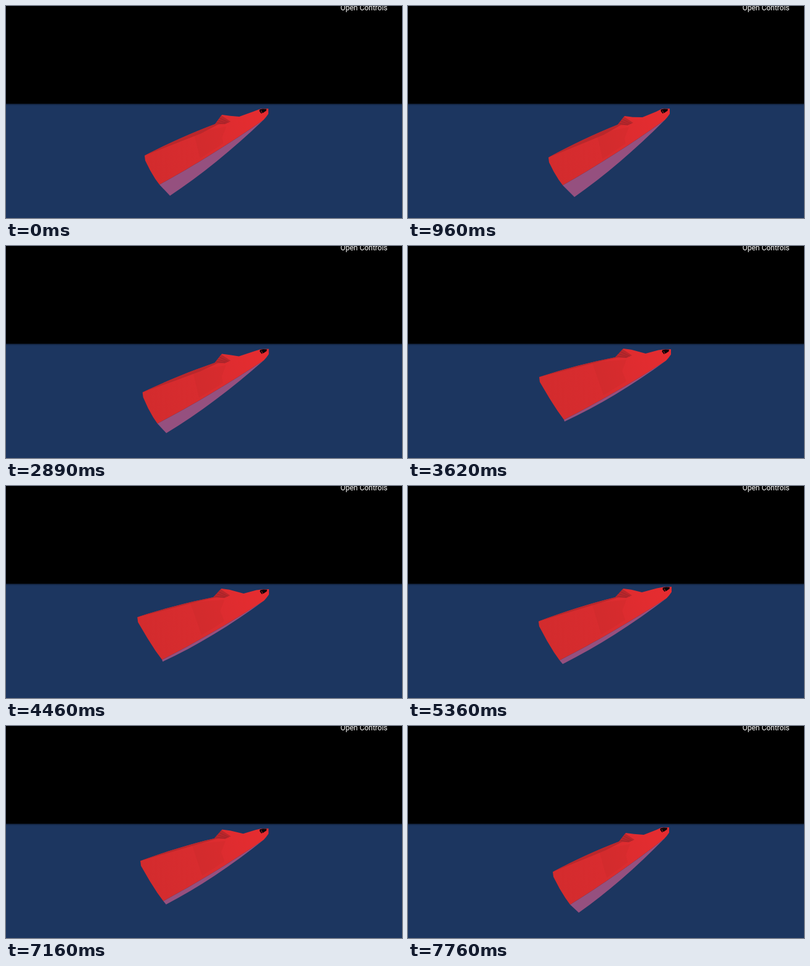
An HTML page that plays this animation: 640 by 343 pixels, repeating every 7840 ms.

```html
<!DOCTYPE html>
<html lang="en">
<head>
<meta charset="utf-8">
<title>Boat on water</title>
<style>
  html, body { margin: 0; width: 100%; height: 100%; overflow: hidden; background: #000; }
  svg { display: block; width: 100%; height: 100%; }
  text { font: 12px Roboto, Arial, sans-serif; fill: #fff; text-anchor: middle; }
</style>
</head>
<body>
<svg viewBox="0 0 640 343">
  <defs>
    <linearGradient id="sea" x1="0" y1="158" x2="0" y2="161" gradientUnits="userSpaceOnUse">
      <stop offset="0" stop-color="#0e1b30"/>
      <stop offset="1" stop-color="#1c3660"/>
    </linearGradient>
    <linearGradient id="paint" x1="220" y1="270" x2="420" y2="175" gradientUnits="userSpaceOnUse">
      <stop offset="0" stop-color="#d22b2d"/>
      <stop offset=".5" stop-color="#d92c2f"/>
      <stop offset="1" stop-color="#e62c30"/>
    </linearGradient>
  </defs>
  <rect width="640" height="343"/>
  <rect y="158" width="640" height="185" fill="url(#sea)"/>
  <text x="578.5" y="7">Open Controls</text>
  <path id="keel" fill="#95507f"/>
  <path id="hull" fill="url(#paint)"/>
  <path id="facet" fill="#b3262a" opacity=".16"/>
  <path id="deck" fill="#ba272b"/>
  <path id="cabin" fill="#b9272b"/>
  <path id="ribs" fill="none" stroke="#99222a" stroke-width=".8"/>
  <path id="bow" fill="#0a0508"/>
  <path id="slit" fill="none" stroke="#d92c2f" stroke-width=".8"/>
</svg>
<script>
const LOOP = 7840;
const LAST = 7760;

// Swell phase in degrees reached at each time in ms.
const swell = [[0, -80], [949, 295], [2190, 765], [3620, 1230], [5360, 1972], [6500, 2365], [7760, 2880]];

// Poses around one swell: phase, then x,y of stern top, chine, keel, shoulder, cabin peak, foredeck, bow.
const poses = [
  [280, 224,242, 248,289, 265,307, 338,191, 349,176, 377,179, 424,166],
  [295, 227,245, 250,290, 269,309, 339,192, 350,178, 379,180, 423,166],
  [360, 234,236, 262,289, 276,302, 341,187, 352,173, 381,176, 422,164],
  [405, 228,234, 257,288, 270,300, 340,186, 352,171, 380,174, 423,162],
  [510, 212,212, 252,281, 253,284, 335,180, 348,166, 384,174, 425,167],
  [532, 211,219, 245,282, 250,288, 335,180, 348,166, 378,172, 426,163],
  [565, 213,224, 238,283, 246,292, 336,184, 349,171, 376,177, 426,167]
];

const part = Object.fromEntries([...document.querySelectorAll('path')].map(p => [p.id, p]));
const draw = (id, d) => part[id].setAttribute('d', d);
const shift = (p, dx, dy) => [p[0] + dx, p[1] + dy];
const mix = (p, q, k) => [p[0] + (q[0] - p[0]) * k, p[1] + (q[1] - p[1]) * k];
const line = (...pts) => 'M' + pts.map(p => p.map(v => v.toFixed(2))).join('L');
const arc = (p, q, sag) => {
  const c = shift(mix(p, q, .5), 0, 2 * sag);
  return Array.from({ length: 9 }, (_, i) => mix(mix(p, c, i / 8), mix(c, q, i / 8), i / 8));
};

function phaseAt(t) {
  let i = 0;
  while (i < swell.length - 2 && t >= swell[i + 1][0]) i++;
  const [t0, a] = swell[i], [t1, b] = swell[i + 1];
  return a + (b - a) * (t - t0) / (t1 - t0);
}

function poseNear(i) {
  const n = poses.length, turn = Math.floor(i / n);
  const [phase, ...xy] = poses[i - turn * n];
  return [phase + 360 * turn, ...xy];
}

// Smooth cyclic curve through the poses.
function poseAt(phase) {
  const angle = 280 + ((phase - 280) % 360 + 360) % 360;
  let i = 0;
  while (poseNear(i + 1)[0] <= angle) i++;
  const [p, q, r, s] = [-1, 0, 1, 2].map(k => poseNear(i + k));
  const span = r[0] - q[0], u = (angle - q[0]) / span;
  const values = q.map((v, j) => {
    const m0 = (r[j] - p[j]) / (r[0] - p[0]) * span;
    const m1 = (s[j] - q[j]) / (s[0] - q[0]) * span;
    const d = r[j] - v;
    return v + u * (m0 + u * (3 * d - 2 * m0 - m1 + u * (m0 + m1 - 2 * d)));
  });
  return Array.from({ length: 7 }, (_, k) => values.slice(1 + 2 * k, 3 + 2 * k));
}

function render(t) {
  const [stern, chine, keel, shoulder, peak, fore, bow] = poseAt(phaseAt(t));
  const foot = shift(bow, -8, 18.5);
  const roll = (keel[0] - chine[0]) / 17;
  const top = arc(stern, shoulder, -2);
  const waterline = arc(chine, foot, 3);

  draw('keel', line(chine, ...arc(keel, foot, 5.5), ...waterline.slice().reverse()) + 'Z');
  draw('hull', line(
    ...top, peak, shift(peak, 13, 1.8), fore, shift(mix(fore, bow, .5), 0, -2),
    shift(bow, -13, .5), bow, shift(bow, 0, 8.5), shift(bow, -4, 14), foot,
    ...waterline.slice().reverse(),
    shift(mix(stern, chine, .78), -1.5, 1), shift(mix(stern, chine, .48), -2.5, 1.5), shift(stern, 1, 8)
  ) + 'Z');
  draw('facet', line(
    mix(stern, shoulder, .75), shift(shoulder, 18, 4), shift(shoulder, 11, 22),
    mix(waterline[5], shoulder, .12), mix(waterline[3], shoulder, .1), mix(stern, shoulder, .7)
  ) + 'Z');
  draw('deck', line(
    ...top, shift(shoulder, 6, 0), shift(mix(stern, shoulder, .8), 0, 5 * roll),
    shift(mix(stern, shoulder, .45), 0, 3 * roll)
  ) + 'Z');

  const corner = shift(peak, 14, 11);
  draw('cabin', line(shoulder, shift(peak, -1, 1), corner, shift(peak, 5, 15), shift(shoulder, 5, .5)) + 'Z');
  draw('ribs', [.35, .6, .85].map(k =>
    line(mix(peak, shoulder, k), mix(corner, shift(peak, 4, 15), k))).join(''));
  draw('bow', line(
    shift(bow, -14, 1.5), shift(bow, -9, .5), shift(bow, -3, .8), shift(bow, -3.5, 3.5),
    shift(bow, -8, 6.5), shift(bow, -11.5, 8), shift(bow, -14.5, 4)
  ) + 'Z');
  draw('slit', line(shift(bow, -12, 3), shift(bow, -9.5, 8)));
}

// The picture advances in steps, coarser at first.
function stepped(t) {
  const [from, step] = t < 3260 ? [0, 73] : [3260, 60];
  return Math.min(LAST, from + Math.floor((t - from) / step) * step);
}

function tick() {
  render(stepped(performance.now() % LOOP));
  requestAnimationFrame(tick);
}
tick();
</script>
</body>
</html>
```
